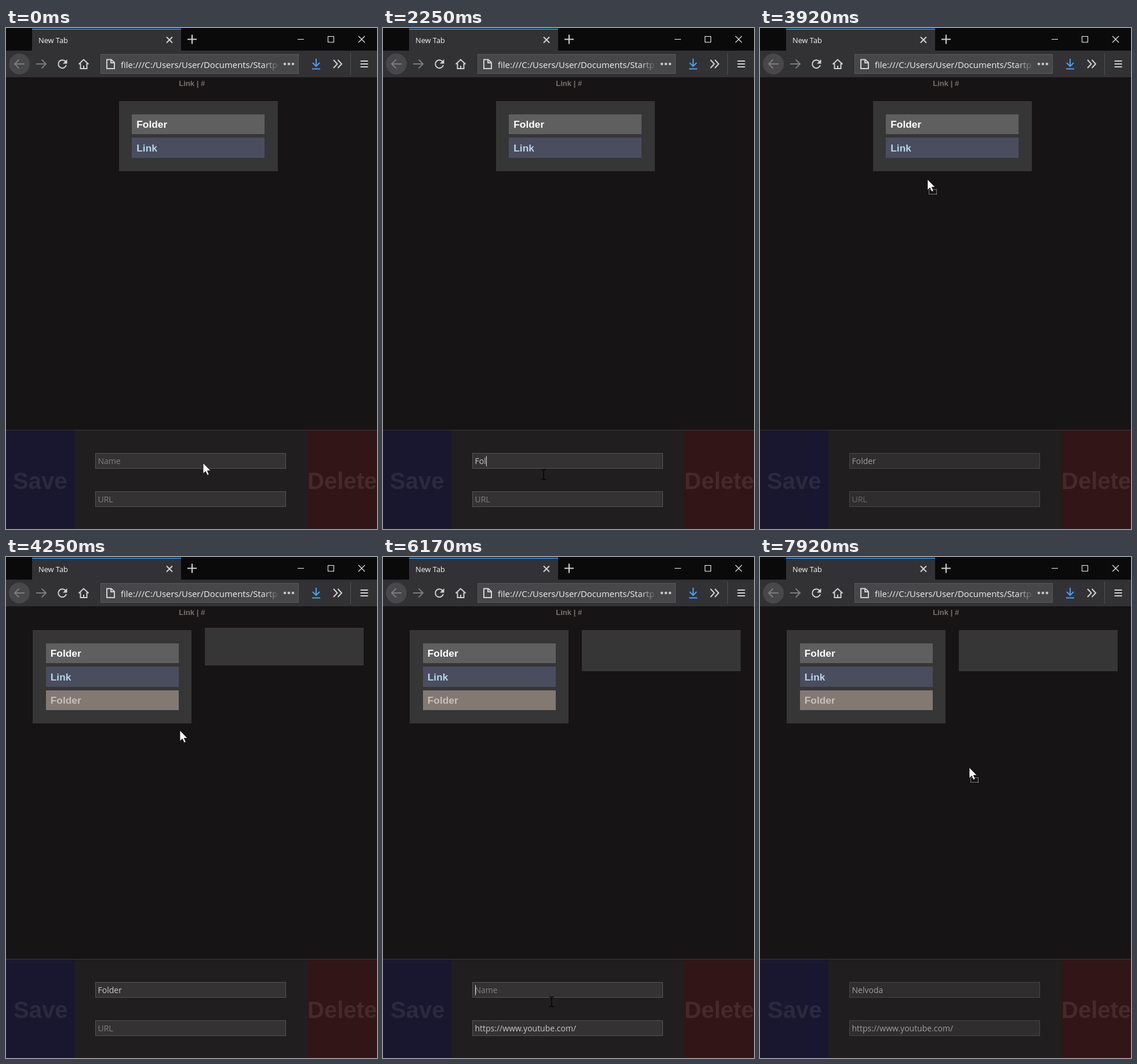
Write an HTML page that moves like this. It is 640 by 864 pixels and loops after 8 s.

```html
<!DOCTYPE html>
<html lang="en">
<head>
<meta charset="utf-8">
<title>Start page editor</title>
<style>
  html, body { margin: 0; height: 100%; overflow: hidden; background: #161415; }
  svg { display: block; }
  rect { shape-rendering: crispEdges; }
  text { white-space: pre; }
  .ui { font-family: "Open Sans", "Noto Sans", sans-serif; }
  .bold { font: bold 17.3px "Liberation Sans", Arial, sans-serif; }
  .big { font-size: 40px; }
  .icon { fill: none; stroke: #d2d2d4; stroke-width: 2; }
  .dim { stroke: #7c7c7e; }
  .field { fill: #343233; stroke: #565455; }
</style>
</head>
<body>
<svg width="640" height="864">
  <defs>
    <linearGradient id="fade" gradientUnits="userSpaceOnUse" x1="444" x2="472" y1="0" y2="0">
      <stop stop-color="#f0f0f1"/><stop offset="1" stop-color="#f0f0f1" stop-opacity="0"/>
    </linearGradient>
  </defs>

  <!-- browser frame -->
  <rect width="640" height="39" fill="#0a0a0b"/>
  <rect y="39" width="640" height="46" fill="#323234"/>
  <rect x="45" y="1" width="257" height="38" fill="#323234"/>
  <rect x="45" y="1" width="257" height="2" fill="#2583dd"/>
  <text class="ui" x="56" y="26" font-size="12.8" fill="#f4f4f5">New Tab</text>
  <path class="icon" stroke="#f0f0f0" d="M277 15.500l10 10m0-10l-10 10M313 19.500h16m-8-8v16"/>
  <path class="icon" style="stroke:#f0f0f0;stroke-width:1.1" d="M503 19.500h11M555.500 14.500h10v10h-10zM608 14l11 11m0-11l-11 11"/>
  <circle cx="23" cy="62" r="18" fill="#48484a"/>
  <path class="icon dim" d="M32 62H15m7.500-7.500L15 62l7.500 7.500M52 62h17m-7.500-7.500L69 62l-7.500 7.500"/>
  <path class="icon" d="M102.500 57.500A7 7 0 1 0 104 64"/>
  <path d="M105.500 54v7.500H98z" fill="#d2d2d4"/>
  <path class="icon" d="M125.500 62.500l8.500-8 8.500 8M128.500 61v9h11v-9M134 70v-5"/>
  <rect x="163.500" y="45.500" width="341" height="33" fill="#474749" stroke="#5a5a5c"/>
  <path class="icon" stroke-width="1.700" d="M174 54.500h7.500l5.500 5v10.500h-13zM181 54.500v5.500h6"/>
  <text class="ui" x="198" y="68.500" font-size="14.9" fill="url(#fade)">file:///C:/Users/User/Documents/Startp</text>
  <g fill="#c4c4c6"><circle cx="481" cy="62" r="2.300"/><circle cx="488" cy="62" r="2.300"/><circle cx="495" cy="62" r="2.300"/></g>
  <path class="icon" style="stroke:#45a1ff" d="M535 53v13m-6-6l6 6 6-6M528 70.500h14"/>
  <path class="icon" d="M565 55l6.500 7-6.500 7m7.500-14l6.500 7-6.500 7M611.500 57h13m-13 5h13m-13 5h13"/>
  <rect x="594" y="43" width="1" height="38" fill="#505052"/>

  <!-- page -->
  <text class="bold" style="font-size:13px" x="298.300" y="99.500" fill="#77716e">Link | #</text>
  <g id="list">
    <rect id="listBox" x="194.500" y="126" width="274" height="121" fill="#363636"/>
    <rect x="217" y="149" width="229" height="34" fill="#5f5f5f"/>
    <text class="bold" x="225.300" y="171.500" fill="#fff">Folder</text>
    <rect x="217" y="189" width="229" height="35" fill="#4a4d5e"/>
    <text class="bold" x="225.300" y="212.500" fill="#b5d6ee">Link</text>
    <g id="added">
      <rect x="217" y="230" width="229" height="34" fill="#837973"/>
      <text class="bold" x="225.300" y="252.500" fill="#c6bfba">Folder</text>
    </g>
  </g>
  <rect id="column" x="343" width="274" fill="#363636"/>

  <!-- editor -->
  <rect y="693" width="640" height="171" fill="#201e1f"/>
  <rect y="694" width="118" height="170" fill="#19172f"/>
  <rect x="520" y="694" width="120" height="170" fill="#321617"/>
  <rect y="692.500" width="640" height="1" fill="#3b393a"/>
  <text id="save" class="bold big" y="795" fill="#2b2940">Save</text>
  <text class="bold big" x="520" y="795" fill="#45292b">Delete</text>
  <g id="inputs" class="ui" font-size="14">
    <rect class="field" x="154.500" y="733.500" width="328" height="26"/>
    <rect class="field" x="154.500" y="799.500" width="328" height="26"/>
    <text id="name" x="158.500" y="752"></text>
    <text id="url" x="158.500" y="818"></text>
    <rect id="caret" width="1" height="18" fill="#dcdcdc"/>
  </g>

  <g id="pointer">
    <path id="arrow" d="M0 0V18.500L4.300 14.600 7.300 21.300 10.200 20 7.300 13.400H13Z" fill="#fff" stroke="#111" stroke-width=".8"/>
    <path id="beam" d="M-4 -8.500H-1.500L0 -7.500 1.500 -8.500H4M0 -7.500V7.500M-4 8.500H-1.500L0 7.500 1.500 8.500H4" fill="none" stroke="#050505" stroke-width="1.400"/>
    <rect id="drop" x="2.500" y="17.500" width="13" height="8" fill="none" stroke="#e6e6e6" stroke-dasharray="1 1"/>
  </g>
</svg>
<script>
const LOOP = 8000, FPS = 12 / 1000;
const ARROW = 0, BEAM = 1, DRAG = 2;
const DROP = 4080;
const el = id => document.getElementById(id);
const show = (id, on) => el(id).setAttribute('visibility', on ? 'visible' : 'hidden');
const set = (id, attrs) => {
  for (const key in attrs) el(id).setAttribute(key, attrs[key]);
};

// time, x, y, pointer kind from that time on
const path = [
  [0, 340, 750, ARROW], [80, 340, 750, ARROW], [420, 305, 755, BEAM],
  [900, 277, 770, BEAM], [2740, 277, 770, ARROW], [3240, 267, 710, ARROW],
  [3410, 267, 710, DRAG], [3990, 290, 240, DRAG], [DROP, 295, 262, ARROW],
  [4240, 300, 299, ARROW], [4410, 300, 303, ARROW], [4990, 286, 792, ARROW],
  [5580, 286, 792, BEAM], [5910, 291, 767, BEAM], [7170, 291, 767, ARROW],
  [7490, 283, 711, ARROW], [7590, 283, 711, ARROW], [7660, 290, 680, DRAG],
  [7910, 361, 363, DRAG], [LOOP, 361, 363, DRAG]
];

function pointerAt(t) {
  const i = path.findIndex(p => p[0] > t) - 1;
  const [t0, x0, y0, kind] = path[i], [t1, x1, y1] = path[i + 1];
  const p = (t - t0) / (t1 - t0), e = p * p * (3 - 2 * p);
  return { x: x0 + (x1 - x0) * e, y: y0 + (y1 - y0) * e, kind };
}

const typed = (word, t, start, step) =>
  word.slice(0, Math.max(0, Math.floor((t - start) / step) + 1));

function fill(id, value, hint) {
  el(id).textContent = value || hint;
  set(id, { fill: value ? '#cbc9ca' : '#807e7f' });
}

function placeCaret(t) {
  const inName = t >= 1910 && t < 2740 || t >= 5910 && t < 7300;
  const inUrl = t >= 4990 && t < 5910;
  show('caret', inName || inUrl);
  const id = inUrl ? 'url' : 'name';
  const empty = inUrl ? t < 5490 : t < 1990 || t >= 6080 && t < 6550;
  const x = empty ? 159 : 158.5 + el(id).getComputedTextLength();
  set('caret', { x: Math.round(x), y: inUrl ? 804 : 738 });
}

function draw(t) {
  const { x, y, kind } = pointerAt(t);
  set('pointer', { transform: `translate(${Math.round(x)} ${Math.round(y)})` });
  show('arrow', kind !== BEAM);
  show('beam', kind === BEAM);
  show('drop', kind === DRAG);
  set('inputs', { opacity: kind === DRAG ? 0.75 : 1 });

  const dropped = t >= DROP;
  set('list', { transform: `translate(${dropped ? -148.5 : 0} 0)` });
  set('listBox', { height: dropped ? 161 : 121 });
  show('added', dropped);
  show('column', dropped);
  const left = Math.max(0, 1 - Math.max(0, t - DROP - 8) / 280) ** 2;
  set('column', { y: 126 - 23 * left, height: 70.5 - 32 * left });
  set('save', { x: dropped ? 13 : 12 });

  fill('name', t < 6080 ? typed('Folder', t, 1990, 110) : typed('Nelvoda', t, 6550, 100), 'Name');
  fill('url', t < 5490 ? '' : 'https://www.youtube.com/', 'URL');
  placeCaret(t);
}

function frame() {
  const t = performance.now() % LOOP;
  draw(Math.floor((t + 4) * FPS) / FPS % LOOP);
  requestAnimationFrame(frame);
}
frame();
</script>
</body>
</html>
```
